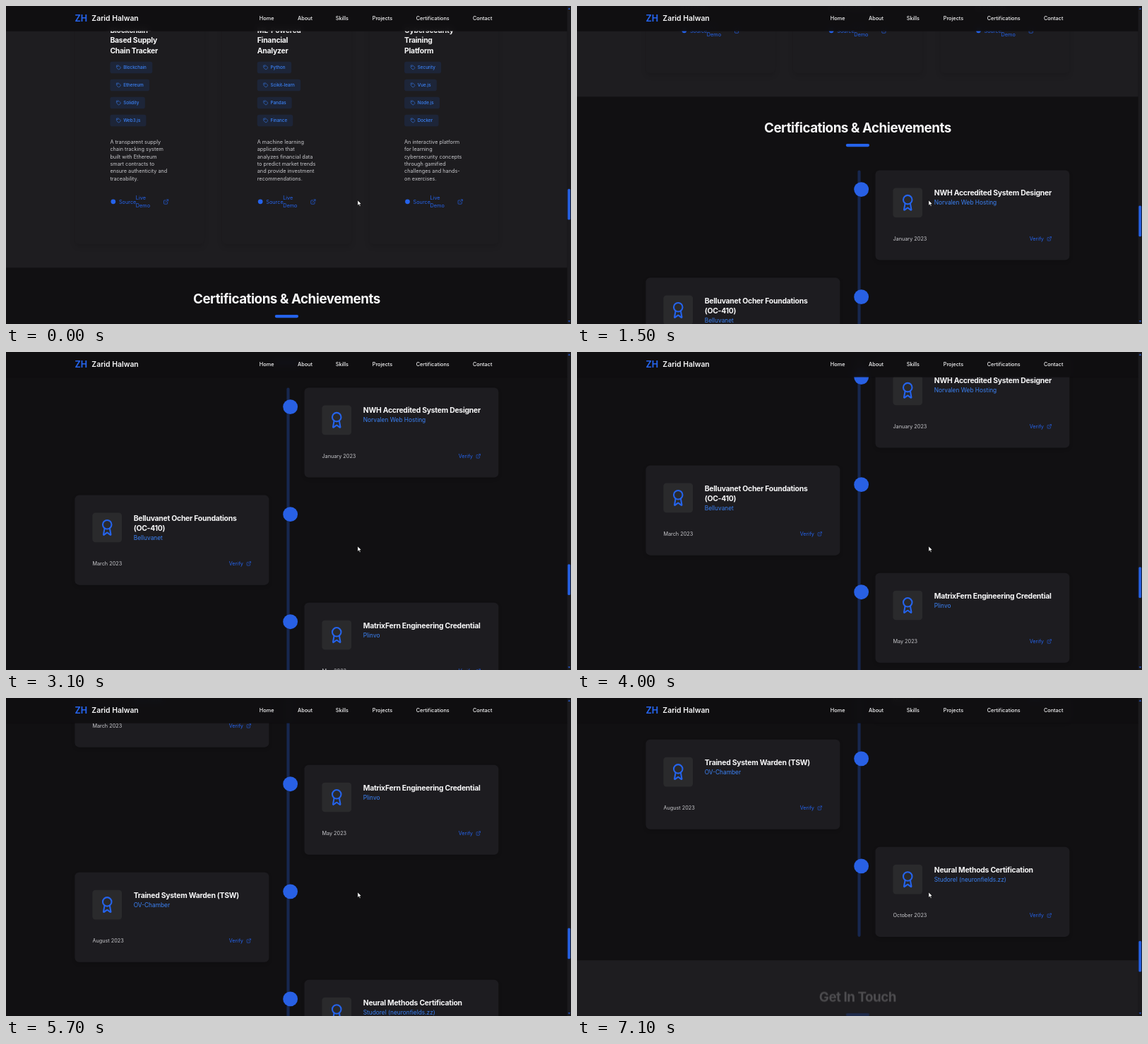
Write an HTML page that moves like this. It is 800 px wide and 450 px high and loops after 7200 ms.

```html
<!DOCTYPE html>
<html lang="en">
<head>
<meta charset="utf-8">
<title>Portfolio scroll</title>
<style>
  html, body { margin: 0; width: 100%; height: 100%; overflow: hidden; background: #111012; }
  /* The page is laid out at 1536 x 864 and shown at 800 x 450. */
  #stage {
    position: absolute; left: 0; top: 0; width: 1536px; height: 864px; overflow: hidden;
    transform: scale(.5208333); transform-origin: 0 0;
    font: 14px/20px Inter, sans-serif; font-optical-sizing: none;
    color: #f8f8f9; background: #111012;
  }
  #stage *, #stage { box-sizing: border-box; }
  #view { position: absolute; left: 0; top: 0; width: 1526px; height: 864px; overflow: hidden; }
  #page { position: absolute; left: 0; top: 0; width: 1526px; height: 3400px; }
  #page div, #page span, #page p, #page h2, #page h3, #page svg, nav span { position: absolute; margin: 0; white-space: nowrap; }
  svg { fill: none; stroke: currentColor; stroke-width: 2; stroke-linecap: round; stroke-linejoin: round; }
  .band { left: 0; width: 100%; background: #1e1d20; }
  h2 { left: 0; width: 100%; font: 700 36px/40px Inter, sans-serif; letter-spacing: -.025em; text-align: center; }
  h3 { font: 700 20px/28px Inter, sans-serif; letter-spacing: -.025em; }
  .bar { left: 731px; width: 64px; height: 8px; border-radius: 4px; background: #2563eb; }
  .project { width: 352px; top: -300px; height: 947px; border-radius: 12px; background: #1d1c1f; box-shadow: 0 8px 16px -3px rgba(0,0,0,.16); }
  .tag { height: 32px; padding: 8px 16px 8px 36px; border-radius: 6px; background: rgba(37,99,235,.12); color: #3b82f6; font: 500 12px/16px Inter, sans-serif; }
  .text { color: #c8c8cc; }
  .link { color: #2563eb; }
  .mark { width: 13px; height: 13px; border-radius: 50%; background: #2563eb; }
  .cert { width: 528px; height: 244px; border-radius: 12px; background: #1d1c20; box-shadow: 0 4px 10px rgba(0,0,0,.15); }
  .badge { left: 48px; top: 48px; width: 80px; height: 80px; border-radius: 8px; background: #2a2a2c; color: #2563eb; }
  .org { color: #3b82f6; font-size: 16px; line-height: 24px; }
  .line { left: 763px; top: 911px; width: 8px; height: 1412px; border-radius: 4px; background: #17274f; }
  .dot { left: 753px; width: 40px; height: 40px; border-radius: 50%; background: #2860e4; }
  nav {
    position: absolute; left: 0; top: 0; width: 1526px; height: 68px; font-weight: 500;
    background: rgba(16,15,17,.95); backdrop-filter: blur(8px); box-shadow: 0 1px 3px rgba(0,0,0,.35);
  }
  nav span { top: 24px; }
  #track { position: absolute; left: 1526px; top: 0; width: 10px; height: 864px; background: #1b1a1d; }
  #thumb { position: absolute; left: 1px; top: 0; width: 7px; height: 84px; border-radius: 3px; background: #2563eb; }
  #track svg, #cursor { position: absolute; left: 0; top: 0; }
</style>
</head>
<body>
<div id="stage">
  <div id="view"><div id="page"></div></div>
  <nav id="nav"></nav>
  <div id="track">
    <svg width="10" height="864" style="stroke:none;fill:#2563eb"><path d="M2 9 5 5 8 9ZM2 855 5 859 8 855Z"/></svg>
    <div id="thumb"></div>
  </div>
  <svg id="cursor" width="16" height="22" style="left:955px;top:528px;overflow:visible">
    <path d="M1 0V14L4.3 11 6.8 16.5 9 15.5 6.6 10.3H11Z" fill="#fff" stroke="#000" stroke-width="1"/>
  </svg>
</div>
<script>
const LOOP = 7200, STEP = 100, SCALE = 800 / 1536;
const page = document.getElementById('page');
const thumb = document.getElementById('thumb');

const icons = {
  tag: '<path d="M12.586 2.586A2 2 0 0 0 11.172 2H4a2 2 0 0 0-2 2v7.172a2 2 0 0 0 .586 1.414l8.704 8.704a2.426 2.426 0 0 0 3.42 0l6.58-6.58a2.426 2.426 0 0 0 0-3.42z"/><circle cx="7.5" cy="7.5" r=".5"/>',
  award: '<path d="m15.477 12.89 1.515 8.526a.5.5 0 0 1-.81.47l-3.58-2.687a1 1 0 0 0-1.197 0l-3.586 2.686a.5.5 0 0 1-.81-.469l1.514-8.526"/><circle cx="12" cy="8" r="6"/>',
  open: '<path d="M15 3h6v6M10 14 21 3M18 13v6a2 2 0 0 1-2 2H5a2 2 0 0 1-2-2V8a2 2 0 0 1 2-2h6"/>'
};
const at = (x, y) => `style="left:${x}px;top:${y}px"`;
const icon = (name, size, x, y, cls = '') =>
  `<svg class="${cls}" viewBox="0 0 24 24" width="${size}" height="${size}" ${at(x, y)}>${icons[name]}</svg>`;

const projects = [
  ['Blockchain-<br>Based Supply<br>Chain Tracker', ['Blockchain', 'Ethereum', 'Solidity', 'Web3.js'],
    'A transparent supply<br>chain tracking system<br>built with Ethereum<br>smart contracts to<br>ensure authenticity and<br>traceability.'],
  ['ML-Powered<br>Financial<br>Analyzer', ['Python', 'Scikit-learn', 'Pandas', 'Finance'],
    'A machine learning<br>application that<br>analyzes financial data<br>to predict market trends<br>and provide investment<br>recommendations.'],
  ['Cybersecurity<br>Training<br>Platform', ['Security', 'Vue.js', 'Node.js', 'Docker'],
    'An interactive platform<br>for learning<br>cybersecurity concepts<br>through gamified<br>challenges and hands-<br>on exercises.']
];
const certs = [
  ['NWH Accredited System Designer', 'Norvalen Web Hosting', 'January 2023'],
  ['Belluvanet Ocher Foundations<br>(OC-410)', 'Belluvanet', 'March 2023'],
  ['MatrixFern Engineering Credential', 'Plinvo', 'May 2023'],
  ['Trained System Warden (TSW)', 'OV-Chamber', 'August 2023'],
  ['Neural Methods Certification', 'Studorel (neuronfields.zz)', 'October 2023']
];
const menu = [['Home', 689], ['About', 793], ['Skills', 896], ['Projects', 996], ['Certifications', 1115], ['Contact', 1269]];

function projectHtml([title, tags, text], i) {
  const x = 283 + 400 * i;
  return `<div class="project" style="left:${x - 96}px"></div><h3 ${at(x, 51)}>${title}</h3>`
    + tags.map((t, k) => `<div class="tag" ${at(x, 151 + 48 * k)}>${icon('tag', 14, 16, 9)}${t}</div>`).join('')
    + `<p class="text" ${at(x, 359)}>${text}</p>`
    + `<div class="mark" ${at(x + 2, 525)}></div><span class="link" ${at(x + 24, 522)}>Source</span>`
    + `<span class="link" ${at(x + 70, 512)}>Live<br>Demo</span>${icon('open', 16, x + 144, 524, 'link')}`;
}

function certHtml([title, org, date], i) {
  const y = 911 + 292 * i, orgY = title.includes('<br>') ? 104 : 76;
  return `<div class="dot" style="top:${y + 32}px"></div>`
    + `<div class="cert" ${at(i % 2 ? 187 : 811, y)}>`
    + `<div class="badge">${icon('award', 48, 16, 16)}</div>`
    + `<h3 ${at(160, 48)}>${title}</h3><span class="org" ${at(160, orgY)}>${org}</span>`
    + `<span class="text" ${at(48, 176)}>${date}</span>`
    + `<span class="link" style="right:70px;top:176px">Verify</span>${icon('open', 14, 466, 179, 'link')}</div>`;
}

const heading = (text, y) => `<h2 style="top:${y}px">${text}</h2><div class="bar" style="top:${y + 64}px"></div>`;

page.innerHTML = '<div class="band" style="top:-400px;height:1111px"></div>'
  + projects.map(projectHtml).join('')
  + heading('Certifications &amp; Achievements', 775)
  + '<div class="line"></div>' + certs.map(certHtml).join('')
  + '<div class="band" style="top:2387px;height:1000px"></div>'
  + `<div id="contact" style="left:0;top:0;width:100%">${heading('Get In Touch', 2451)}</div>`;
const contact = document.getElementById('contact');

document.getElementById('nav').innerHTML =
  '<span style="left:187px;top:20px;font:700 24px/28px Inter,sans-serif;color:#2563eb">ZH</span>'
  + '<span style="left:233px;top:20px;font:600 20px/28px Inter,sans-serif">Zarid Halwan</span>'
  + menu.map(([label, x]) => `<span style="left:${x}px">${label}</span>`).join('');

// Scroll distance in stage pixels by time, with rests between wheel bursts.
const keys = [[0, 0], [1500, 242], [1600, 242], [2500, 371], [3700, 450], [3800, 450], [4000, 466],
  [4800, 582], [5700, 684], [6200, 794], [6300, 795], [6500, 795], [7100, 872]];
const rate = i => (keys[i + 1][1] - keys[i][1]) / (keys[i + 1][0] - keys[i][0]);
const slopes = keys.map((_, i) => {
  if (i === 0) return rate(0);
  if (i === keys.length - 1) return rate(i - 1);
  const a = rate(i - 1), b = rate(i);
  return a * b > 0 ? 2 * a * b / (a + b) : 0;
});

// Monotone cubic interpolation between the keys.
function scrollAt(t) {
  let i = 0;
  while (i < keys.length - 2 && t >= keys[i + 1][0]) i++;
  const [t0, a] = keys[i], [t1, b] = keys[i + 1];
  const d = t1 - t0, u = (t - t0) / d, v = 1 - u;
  return a * v * v * (1 + 2 * u) + b * u * u * (3 - 2 * u)
    + d * u * v * (slopes[i] * v - slopes[i + 1] * u);
}

function draw(now) {
  const t = Math.floor(now % LOOP / STEP) * STEP;
  const y = Math.round(scrollAt(t)) / SCALE;
  page.style.transform = `translateY(${-y}px)`;
  thumb.style.transform = `translateY(${497 + y * .0975}px)`;
  const p = Math.min(1, Math.max(0, (t - 6860) / 1100));
  contact.style.opacity = p;
  contact.style.transform = `translateY(${20 * (1 - p)}px)`;
}

function tick() {
  draw(performance.now());
  requestAnimationFrame(tick);
}
tick();
</script>
</body>
</html>
```
